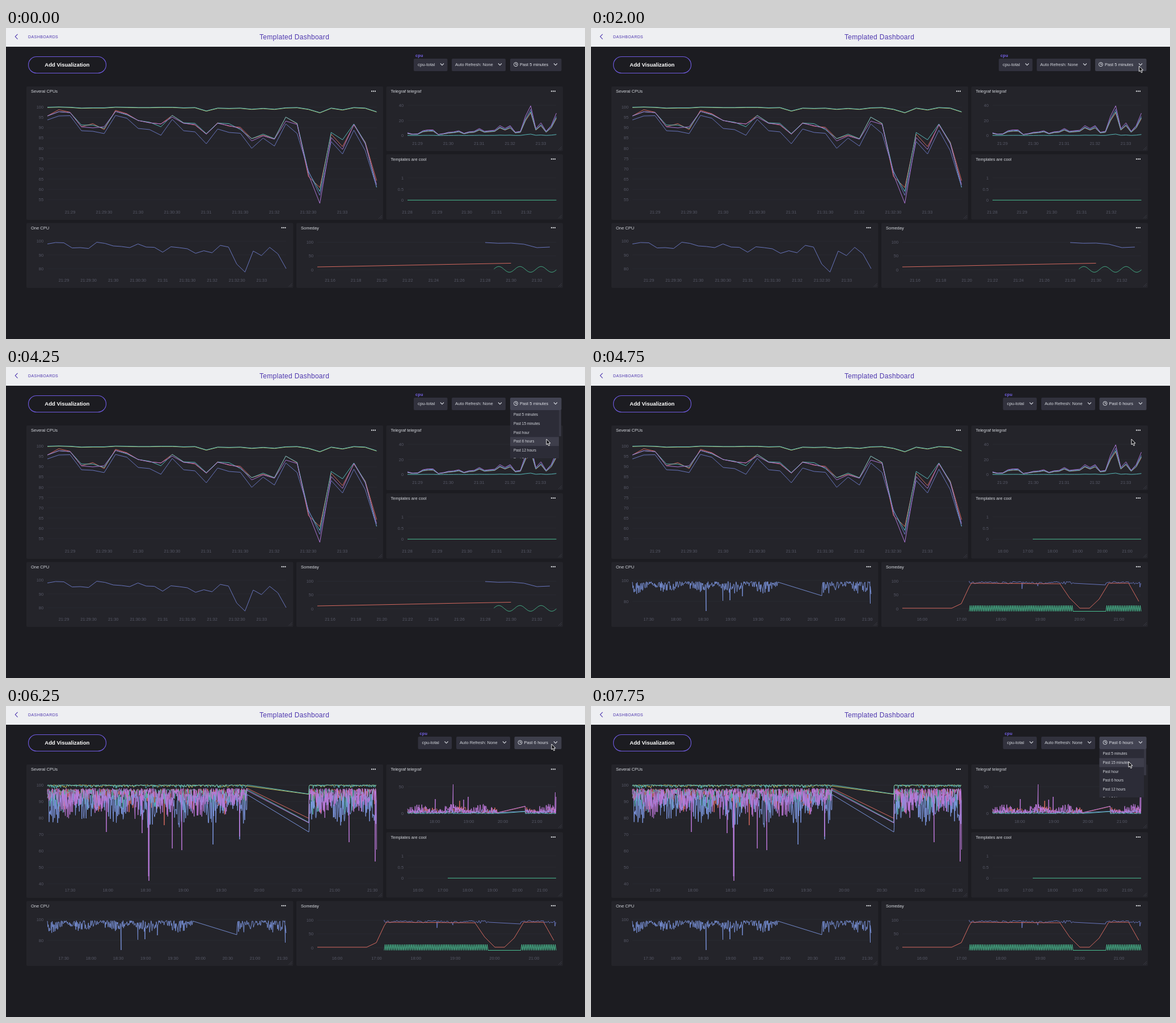
Animation of 1021x548 px, one loop 8 s. Source, as an HTML page:

```html
<!DOCTYPE html>
<html lang="en">
<head>
<meta charset="utf-8">
<title>Templated Dashboard</title>
<style>
html, body { margin: 0; width: 100%; height: 100%; overflow: hidden; background: #1c1c21; }
svg { display: block; width: 100%; height: 100%; font-family: "Liberation Sans", Arial, sans-serif; }
polyline, .line { fill: none; stroke-linejoin: round; }
</style>
</head>
<body>
<svg id="stage" viewBox="0 0 1021 548"></svg>
<script>
const LOOP = 8000, STEP = 250;
const BLUE = '#6875bd', VIOLET = '#a873d0', RED = '#d5695f', GREEN = '#49bf92',
      TEAL = '#58b9b8', YELLOW = '#c9c865', SKY = '#7c96df', ORCHID = '#bd78da';

// y is the middle of the capitals
const text = (x, y, s, size, fill, more = '') =>
  `<text x="${x}" y="${(y + size * .36).toFixed(2)}" font-size="${size}" fill="${fill}" ${more}>${s}</text>`;
const rect = (x, y, w, h, fill, rx = 0) =>
  `<rect x="${x}" y="${y}" width="${w}" height="${h}" rx="${rx}" fill="${fill}"/>`;
const line = (pts, color, width = 1) =>
  `<polyline points="${pts.map(p => p[0].toFixed(2) + ',' + p[1].toFixed(2)).join(' ')}" stroke="${color}" stroke-width="${width}"/>`;
const spread = (x0, x1, ys) => ys.map((y, i) => [x0 + (x1 - x0) * i / (ys.length - 1), y]);
const clock = m => `${Math.floor(m / 60)}:${String(Math.floor(m % 60)).padStart(2, '0')}${m % 1 ? ':30' : ''}`;

function random(seed) {
  return () => (seed = (seed * 16807) % 2147483647) / 2147483647;
}

// Seeded jitter from y = top by up to depth, with fixed points mixed in
function rough(seed, spans, step, top, depth, power, fixed = []) {
  const rnd = random(seed * 7919), pts = [...fixed];
  for (const [a, b] of spans)
    for (let x = a; x <= b; x += step) {
      const calm = .7 + .3 * Math.sin(x / 9 + seed);
      pts.push([x, top + depth * calm * rnd() ** power]);
    }
  return pts.sort((p, q) => p[0] - q[0]);
}

function zigzag(spans) {
  const pts = [];
  for (const [a, b] of spans)
    for (let x = a, up = 0; x <= b; x += 1.55, up ^= 1) pts.push([x, up ? 420 : 430.5]);
  return pts;
}

// rows: [label, y]; ticks: [first minute, minutes apart, x, dx, count]
function plot(x0, x1, rows, tickY, ticks, lines) {
  let s = '';
  for (const [label, y] of rows)
    s += `<path d="M${x0} ${y}H${x1}" stroke="#2a2b33" stroke-width=".8"/>` +
      text(x0 - 7, y, label, 7.4, '#565866', 'text-anchor="end"');
  const [m, dm, x, dx, n] = ticks;
  for (let i = 0; i < n; i++)
    s += text(x + dx * i, tickY, clock(m + dm * i), 7.4, '#565866', 'text-anchor="middle"');
  return s + lines;
}

function panel(x, y, w, h, title) {
  const r = x + w, b = y + h;
  return rect(x, y, w, h, '#24242a', 2) + text(x + 8, y + 8.7, title, 7.5, '#d4d7dd') +
    [-3, 0, 3].map(d => `<circle cx="${r - 17 + d}" cy="${y + 8.4}" r="1.1" fill="#e4e6ea"/>`).join('') +
    `<path d="M${r - 8} ${b - 2}l6 -6M${r - 5} ${b - 2}l3 -3" stroke="#3a3b45" stroke-width=".9"/>`;
}

const levels = (first, step, y, dy, n) => Array.from({length: n}, (_, i) => [first - step * i, y + dy * i]);

// Five-minute series
const cpuRed = [155,144,148.5,174,168.5,179,145,151,163,167,169,154,167.5,171,187,167,173,175,195,189,195,157,169,262,281,187,209,171,201,269];
const cpuGreen = [155,147.5,149,171,171,177,147,153,163,166,174,154,167,168,186,167.5,168.5,179,195,187,195,157,168,254,288,184,197,169,202,281];
const cpuBlue = [162,155,154.5,181,182,186,154,159,177,179,189,161,181,183,204,178,184,185.5,212,194,208,169,186,252,295,200,222,180,216,280];
const cpuViolet = [155,147.5,149,174,176,174,147,152,163,167,169,157,168,170,187,168,172,177,199,190,196,164,170,258,309,193,214,170,204,276];
const cpuTop = [139.5,139,139.5,141,140.5,140.5,139.2,139.5,140,140,139.5,139.5,140.5,140,146,141,141.5,141,143,141.5,143,140.5,140,143,149,141,144,140,141,147.5];
const load = [185,187,186.5,181,179.5,179.5,187.5,186,184,183,181,185.5,183,182,177,182,181,180,172,177,172,183.5,182,155,137,177,167,182,172,150];
const single = [380.5,378,378.5,387.5,387,388.5,377.5,379.5,384,385,387,380.5,386,386.5,395,385.5,387,389,397,392.5,396,383,386,416,430,393,401,386.5,398,424];

const big = ys => spread(73, 653.5, ys), small = ys => spread(708, 970.5, ys);
const wave = Array.from({length: 111}, (_, i) => [860.5 + i, 425.3 - 5 * Math.cos((i - 8.5) / 37.3 * 2 * Math.PI)]);
const scaled = (k, bump) => load.map((y, i) => 189.5 - (189.5 - y) * k - (i % 4 ? 0 : bump));

// Six-hour series
const wide = [[73, 425], [534.5, 653]], narrow = [[708, 866], [916, 970]],
      lower = [[73, 329], [407.5, 493]], mixed = [[667, 851], [908, 970]];
const deep = [[177, 222], [240, 224], [251.3, 300], [252, 308], [293.2, 251], [310, 254], [412, 230], [605, 240], [651, 274], [653.5, 253]];

const charts = [
  { swap: 5000, short: plot(73, 654, levels(100, 5, 139.5, 18.1, 10), 324, [1289, .5, 113, 60, 9],
      line(big(cpuTop.map(y => y + .6)), YELLOW) + line(big(cpuTop), TEAL) +
      line(big(cpuRed), RED) + line(big(cpuGreen), TEAL) + line(big(cpuBlue), BLUE) + line(big(cpuViolet), VIOLET)),
    long: plot(73, 654, levels(100, 10, 139.5, 28.95, 7), 324, [1050, 30, 113, 66.65, 9],
      line(rough(3, wide, 1.1, 146, 46, 2, [[279, 210], [425.2, 145], [534, 198]]), RED) +
      line(rough(4, wide, 1.1, 147, 48, 2, [[425.2, 147], [534, 205]]), TEAL) +
      line(rough(5, wide, .75, 154, 62, 1.6, [[252, 300], [365, 244], [412, 235], [425.2, 156], [534, 222]]), SKY) +
      line(rough(8, wide, .75, 145, 55, 1.6, [...deep, [425.2, 149], [534, 206]]), ORCHID) +
      line(rough(9, wide, 1.5, 139, 5, 2, [[425.2, 141], [534, 155.5]]), YELLOW) +
      line(rough(11, wide, .9, 138.8, 7, 2, [[425.2, 139], [534, 155]]), TEAL)) },
  { swap: 5000, short: plot(708, 970, [[40, 136], [20, 163], [0, 189.5]], 203.5, [1289, 1, 725.5, 54.4, 5],
      line(small(scaled(.76, 0)), RED) + line(small(scaled(.86, 1)), BLUE) + line(small(scaled(.8, 0)), TEAL) +
      line(small(load), VIOLET) + line(small(load.map(y => 189.6 - (189.5 - y) * .05)), TEAL)),
    long: plot(708, 970, [[50, 142], [0, 189.5]], 203.5, [1080, 60, 756, 60.1, 4],
      line(rough(13, narrow, 1.1, 189, -12, 1.6, [[800, 167], [866.5, 188.5], [915.5, 177]]), RED) +
      line(rough(14, narrow, .8, 189, -9, 1.4, [[866.5, 188], [915.5, 185.5]]), SKY) +
      line(rough(15, narrow, .7, 189, -17, 1.6, [[757, 164], [788.5, 138], [807, 165], [815, 160], [866.5, 188], [915.5, 176.5], [968.5, 152], [970, 160]]), ORCHID) +
      line(rough(16, narrow, 1.5, 189.7, -2, 2, [[866.5, 189.5], [915.5, 186]]), TEAL)) },
  { swap: 4750, short: plot(708, 970, [[1, 264], [.5, 284], [0, 303.5]], 324, [1288, 1, 707.5, 52.5, 5],
      line([[708, 303.3], [970.5, 303.3]], GREEN)),
    long: plot(708, 970, [[1, 264], [.5, 284], [0, 303.5]], 324, [960, 60, 726.5, 43.8, 6],
      line([[779, 303.3], [970, 303.3]], GREEN)) },
  { swap: 4750, short: plot(73, 494, levels(100, 10, 375.7, 24.2, 3), 444, [1289, .5, 102, 43.6, 9],
      line(spread(73, 494, single), BLUE)),
    long: plot(73, 494, [[100, 376], [80, 413]], 444, [1050, 30, 101.7, 48.2, 9],
      line(rough(18, lower, .85, 378, 22, 1.5, [[202.5, 404], [203, 430], [232.5, 412], [245, 411], [267, 404], [329.5, 379], [407, 403], [492.5, 417], [494, 400]]), SKY, .9)) },
  { swap: 4750, short: plot(549, 970, [[100, 377.5], [50, 401.5], [0, 426]], 444, [1276, 2, 571.5, 45.6, 9],
      line(spread(845, 959, [378, 379.3, 379, 381, 387, 386]), BLUE) +
      line([[549, 421], [620, 419.7], [780, 416.5], [890.5, 414.5]], RED) + line(wave, GREEN)),
    long: plot(549, 970, [[100, 377.5], [50, 401.5], [0, 426]], 444, [960, 60, 584, 69.4, 6],
      line(zigzag(mixed), GREEN) +
      line(rough(21, mixed, 2.2, 378, 6, 1.2, [[667, 377], [760, 391], [788, 386], [851.5, 381], [907, 384], [968, 388]]), BLUE) +
      line([[549, 425], [636, 425], [653, 417], [667, 387], [671, 381], [827, 382], [844, 407], [862, 425], [879, 425], [896, 409], [913, 381], [948, 381], [966, 413]], RED)) }
];

const chevron = x => `<path class="line" d="M${x - 3} 62.5l3 3.2 3 -3.2" stroke="#d4d7dd" stroke-width="1.1"/>`;
function controls(x, auto, past, range) {
  const c = past + 10;
  return text(x + 3, 48.8, 'cpu', 7.2, '#7a65f2', 'font-weight="bold" letter-spacing=".25"') +
    rect(x, 54, 59.5, 22, '#31313d', 2) + text(x + 7, 64, 'cpu-total', 7.9, '#d4d7dd') + chevron(x + 50) +
    rect(auto, 54, 95, 22, '#31313d', 2) + text(auto + 6, 64, 'Auto Refresh: None', 7.6, '#d4d7dd') + chevron(auto + 85) +
    `<rect class="past" x="${past}" y="54" width="${979.5 - past}" height="22" rx="2"/>` +
    `<g class="line" stroke="#d4d7dd"><circle cx="${c}" cy="64.2" r="3.5"/><path d="M${c} 62v2.4h2"/></g>` +
    text(past + 17, 64, range, 7.6, '#e0e2e8') + chevron(969);
}

const ranges = ['Past 5 minutes', 'Past 15 minutes', 'Past hour', 'Past 6 hours', 'Past 12 hours', 'Past 24 hours'];
const ROW = 15.8;
const menu = x => `<g clip-path="url(#fold)">` + rect(x, 76, 975 - x, 90, '#2c2c37') +
  `<rect class="hot" x="${x}" width="${975 - x}" height="15.8" fill="#3e3e4b"/>` +
  ranges.map((s, i) => text(x + 6, 83.6 + ROW * i, s, 6.5, '#d4d7dd')).join('') +
  rect(975, 76, 4, 46, '#373743') + '</g>';

const stage = document.getElementById('stage');
stage.innerHTML =
  '<clipPath id="fold"><rect x="880" y="76" width="100" height="85"/></clipPath>' +
  rect(0, 0, 1021, 548, '#1c1c21') + rect(0, 0, 1021, 33, '#eeeff2') +
  '<path class="line" d="M20.5 10.8l-4.3 4.4 4.3 4.4" stroke="#4d36ae" stroke-width="1.1"/>' +
  text(39, 15.2, 'DASHBOARDS', 7, '#4d36ae', 'letter-spacing=".42"') +
  text(447, 15.8, 'Templated Dashboard', 12, '#4d36ae', 'letter-spacing=".3"') +
  '<rect x="39.5" y="50.5" width="137" height="29" rx="14.5" fill="none" stroke="#6f5be0" stroke-width="1.1"/>' +
  text(68.3, 64.3, 'Add Visualization', 9.5, '#ffffff', 'font-weight="bold"') +
  panel(36, 103, 629, 235, 'Several CPUs') + panel(670.5, 103, 311.5, 114, 'Telegraf telegraf') +
  panel(670.5, 222.5, 311.5, 115, 'Templates are cool') + panel(36, 343.5, 470.5, 114.5, 'One CPU') +
  panel(512, 343.5, 470, 114.5, 'Someday') +
  charts.map(c => `<g class="short">${c.short}</g><g class="long">${c.long}</g>`).join('') +
  `<g class="bar">${controls(719, 786, 889, ranges[0])}</g><g class="bar">${controls(726.5, 794, 896.5, ranges[3])}</g>` +
  `<g class="menu">${menu(889)}</g><g class="menu">${menu(896.5)}</g>` +
  '<path id="cursor" d="M0 0V9.8L2.2 7.9 3.9 11.7 5.7 10.9 4 7.2H7Z" fill="#141418" stroke="#fff" stroke-width=".9"/>';

const all = s => [...stage.querySelectorAll(s)];
const shorts = all('.short'), longs = all('.long'), bars = all('.bar'), menus = all('.menu'),
      pasts = all('.past'), hots = all('.hot'), cursor = document.getElementById('cursor');
const show = (el, on) => el.style.display = on ? '' : 'none';

// [time, x, y], each held until the next
const moves = [[500, 850, 300], [750, 885, 225], [1000, 920, 160], [1250, 945, 115], [1500, 960, 88], [2000, 966.5, 67],
  [3000, 961, 84], [3250, 957.5, 104], [3500, 956.5, 112], [3750, 955, 120], [4000, 953, 127],
  [5500, 954, 120], [5750, 957, 102], [6000, 960, 84], [6250, 962, 67], [7500, 955, 86], [7750, 948, 98]];

function draw(t) {
  t = Math.floor(t / STEP) * STEP;
  charts.forEach((c, i) => {
    show(shorts[i], t < c.swap);
    show(longs[i], t >= c.swap);
  });
  const picked = t >= 4500 ? 1 : 0, open = t >= (picked ? 6750 : 2500);
  const at = moves.filter(m => m[0] <= t).pop();
  bars.forEach((b, i) => show(b, i === picked));
  menus.forEach((m, i) => show(m, open && i === picked));
  pasts.forEach(p => p.setAttribute('fill', open ? '#434453' : t >= 2000 ? '#3e3f4c' : '#31313d'));
  show(cursor, at);
  if (!at) return;
  const row = Math.floor((at[2] - 76) / ROW);
  hots.forEach(h => { show(h, row >= 0); h.setAttribute('y', 76 + ROW * row); });
  cursor.setAttribute('transform', `translate(${at[1]} ${at[2]})`);
}

const start = performance.now();
function tick() {
  draw((performance.now() - start) % LOOP);
  requestAnimationFrame(tick);
}
tick();
</script>
</body>
</html>
```
